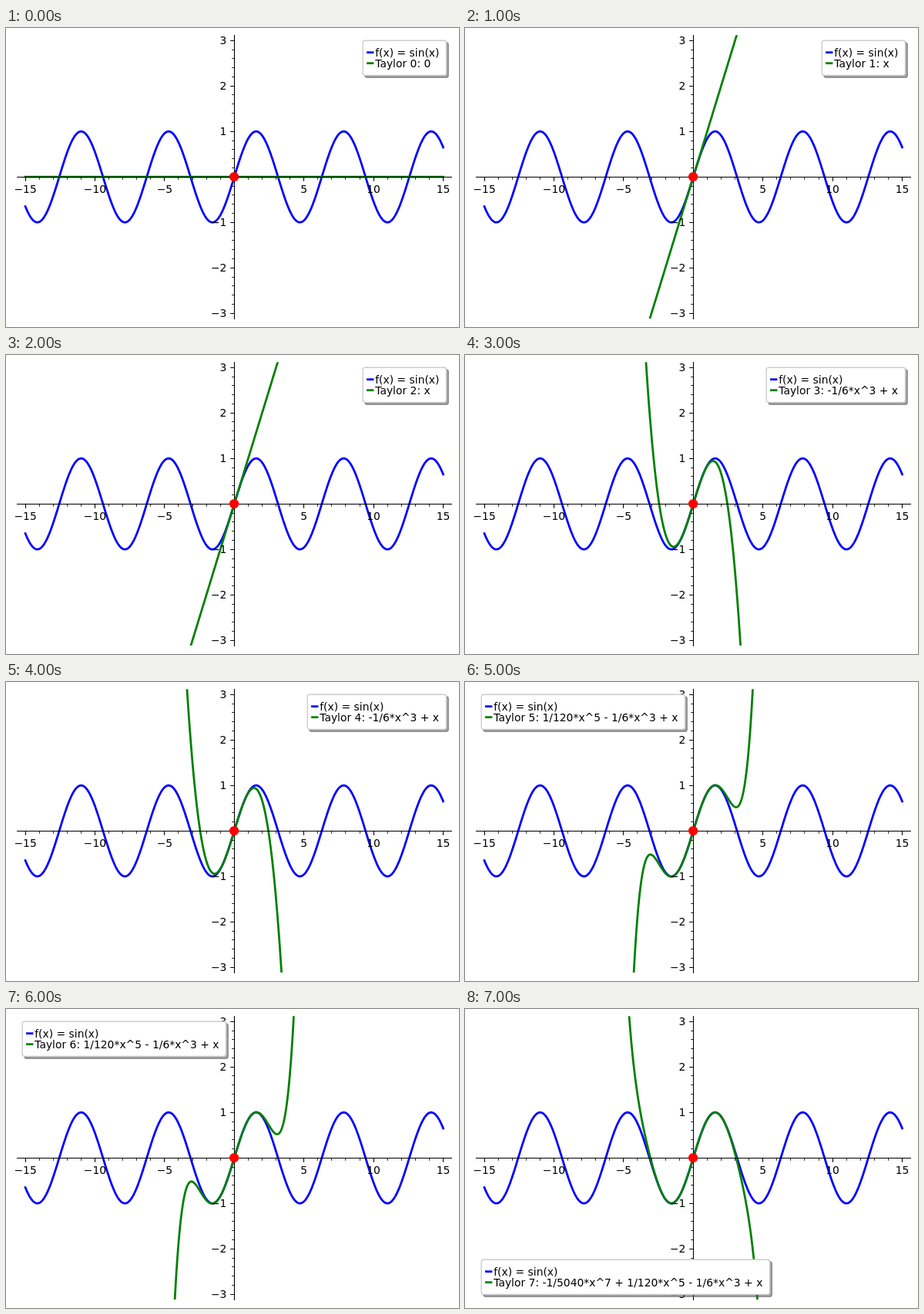
Write an HTML page that moves like this. It is 588 by 388 pixels and loops after 8000 ms.

```html
<!DOCTYPE html>
<html lang="en">
<head>
<meta charset="utf-8">
<title>Taylor polynomials of sin(x)</title>
<style>
html, body { margin: 0; width: 100%; height: 100%; overflow: hidden; background: #fff; }
svg { display: block; width: 588px; height: 388px; }
text { font: 13.889px "DejaVu Sans", sans-serif; white-space: pre; }
.curve { fill: none; stroke-width: 2.78; stroke-linecap: square; stroke-linejoin: round; }
.axis { fill: none; stroke: #000; stroke-width: 1.1; }
.minor { fill: none; stroke: #000; stroke-width: .85; }
</style>
</head>
<body>
<svg viewBox="0 0 588 388">
  <clipPath id="plot"><rect x="14" y="9.3" width="565" height="367.7"/></clipPath>
  <g clip-path="url(#plot)">
    <path id="sine" class="curve" stroke="#00f"/>
    <path id="taylor" class="curve" stroke="#008000"/>
  </g>
  <path id="axes" class="axis"/>
  <path id="minor" class="minor"/>
  <g id="labels"></g>
  <circle cx="296.1" cy="193.1" r="6.2" fill="#f00"/>
  <g id="legend">
    <rect id="shadow" x="2.78" y="2.78" height="45.2" rx="2.8" fill="#4c4c4c" fill-opacity=".5" stroke="#4c4c4c" stroke-opacity=".5" stroke-width="1.39"/>
    <rect id="frame" height="45.2" rx="2.8" fill="#fff" stroke="#ccc" stroke-width="1.39"/>
    <path d="M4.9 15.5h9.3" stroke="#00f" stroke-width="2.78"/>
    <path d="M4.9 29.5h9.3" stroke="#008000" stroke-width="2.78"/>
    <text x="16" y="20.9">f(x) = sin(x)</text>
    <text id="term" x="16" y="34.9"></text>
  </g>
</svg>
<script>
const STEP = 1000, X0 = 296.3, Y0 = 193.2, SX = 18.08, SY = 59;
const $ = id => document.getElementById(id);
const px = x => X0 + x * SX, py = y => Y0 - y * SY;
const snap = v => Math.floor(v) + .5;

function curve(f) {
  let d = '';
  for (let i = -300; i <= 300; i++) {
    const x = i / 20;
    d += (d ? 'L' : 'M') + px(x).toFixed(2) + ' ' + py(f(x)).toFixed(2);
  }
  return d;
}

// Sum of the odd terms up to the given degree
const taylor = degree => x => {
  let sum = 0, term = x;
  for (let n = 1; n <= degree; n += 2) {
    sum += term;
    term *= -x * x / ((n + 1) * (n + 2));
  }
  return sum;
};

function label(s, x, y, anchor) {
  const t = document.createElementNS('http://www.w3.org/2000/svg', 'text');
  t.textContent = String(s).replace('-', '\u2212');
  t.setAttribute('x', x);
  t.setAttribute('y', y);
  t.setAttribute('text-anchor', anchor);
  $('labels').append(t);
}

function drawAxes() {
  const ax = snap(X0), ay = snap(Y0);
  let major = `M14 ${ay}H579M${ax} 9V378`, minor = '';
  for (let i = -15; i <= 15; i++) {
    const at = `M${snap(px(i))} ${ay}`;
    if (i % 5) minor += at + 'v3.3';
    else if (i) {
      major += at + 'v5.3';
      label(i, px(i), 213.6, 'middle');
    }
    const at2 = `M${ax} ${snap(py(i / 5))}`;
    if (i % 5) minor += at2 + 'h-3.3';
    else if (i) {
      major += at2 + 'h-5.3';
      label(i / 5, 286.4, py(i / 5) + 5.2, 'end');
    }
  }
  $('axes').setAttribute('d', major);
  $('minor').setAttribute('d', minor);
}

const cubic = '-1/6*x^3 + x', quintic = '1/120*x^5 - 1/6*x^3 + x';
const right = [463.2, 16.2, 108.3], wide = [391.2, 16.2, 180.3], left = [21.2, 16.2, 264.3];
const steps = [
  ['0', right], ['x', right], ['x', right],
  [cubic, wide], [cubic, wide],
  [quintic, left], [quintic, left],
  ['-1/5040*x^7 + ' + quintic, [21.2, 325.2, 374.4], -.8]
];

function show(n) {
  const [term, [x, y, w]] = steps[n];
  $('taylor').setAttribute('d', curve(taylor(n)));
  $('legend').setAttribute('transform', `translate(${x} ${y})`);
  $('frame').setAttribute('width', w);
  $('shadow').setAttribute('width', w);
  $('term').textContent = `Taylor ${n}: ${term}`;
}

$('sine').setAttribute('d', curve(Math.sin));
drawAxes();
let shown = 0;
show(0);
const start = performance.now();
function tick() {
  const n = Math.floor((performance.now() - start) / STEP) % steps.length;
  if (n !== shown) show(shown = n);
  requestAnimationFrame(tick);
}
requestAnimationFrame(tick);
</script>
</body>
</html>
```
